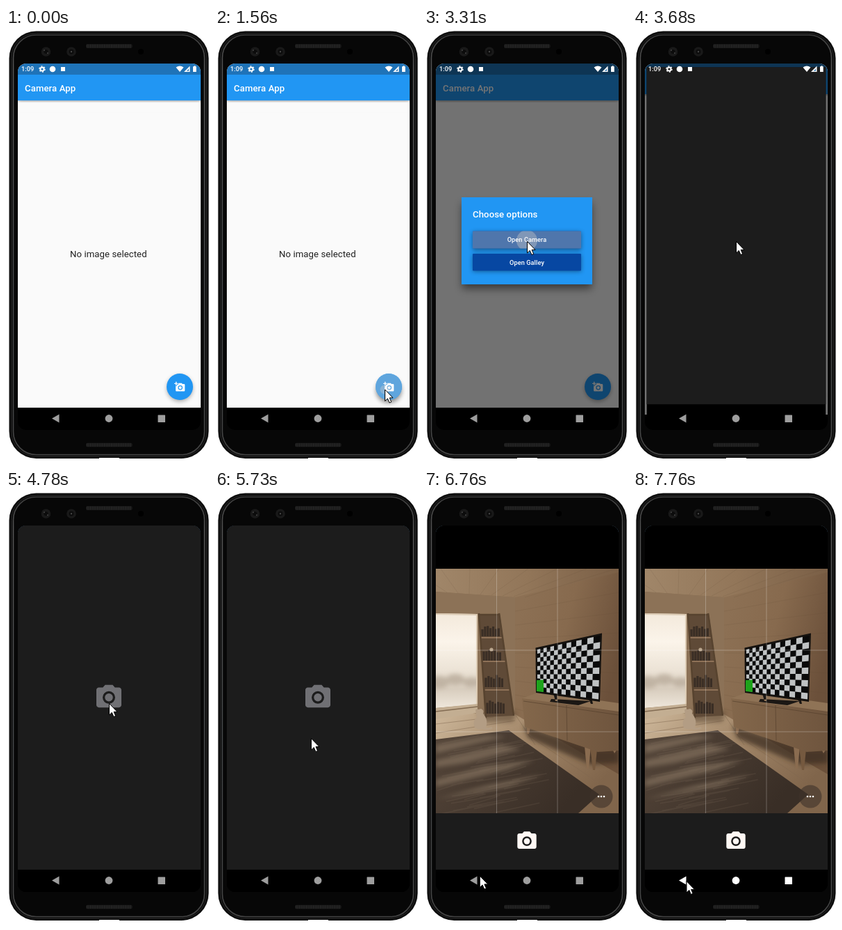
Write an HTML page that moves like this. It is 292 px wide and 623 px high and loops after 8 s.

```html
<!DOCTYPE html>
<html lang="en">
<head>
<meta charset="utf-8">
<title>Camera App</title>
<style>
html, body { margin: 0; width: 100%; height: 100%; overflow: hidden; background: #fff; }
svg { display: block; width: 100vw; height: 100vh; }
text { font-family: Roboto, sans-serif; letter-spacing: .07px; fill: #fff; }
.t { font-size: 13.2px; font-weight: 500; }
.b { font-size: 9.2px; font-weight: 500; text-anchor: middle; }
</style>
</head>
<body>
<svg viewBox="0 0 292 623" xmlns="http://www.w3.org/2000/svg">
<defs>
  <clipPath id="screen"><rect x="17" y="51" width="263" height="526" rx="12"/></clipPath>
  <clipPath id="fabClip"><circle cx="250" cy="515" r="19"/></clipPath>
  <clipPath id="btnClip"><rect x="70" y="291.5" width="156" height="25" rx="1.3"/></clipPath>
  <clipPath id="view"><rect x="17" y="113" width="263" height="351"/></clipPath>
  <clipPath id="pane"><path d="M17 177 76 178V308L17 313z"/></clipPath>
  <clipPath id="rugClip"><path d="M17 358 122 345 252 437 222 464H17z"/></clipPath>
  <filter id="soft" x="-40%" y="-40%" width="180%" height="180%"><feGaussianBlur stdDeviation="3"/></filter>
  <filter id="wide" x="-20%" y="-30%" width="140%" height="160%"><feGaussianBlur stdDeviation="6"/></filter>
  <linearGradient id="rim" x2="0" y2="1">
    <stop offset="0" stop-color="#3c3c3c"/><stop offset=".08" stop-color="#555"/>
    <stop offset=".6" stop-color="#45484a"/><stop offset="1" stop-color="#444"/>
  </linearGradient>
  <linearGradient id="wall" gradientUnits="userSpaceOnUse" x1="131" y1="200" x2="280" y2="240">
    <stop offset="0" stop-color="#8c7054"/><stop offset=".45" stop-color="#876a4e"/><stop offset="1" stop-color="#6b503a"/>
  </linearGradient>
  <linearGradient id="ceil" x2="1"><stop offset="0" stop-color="#a08669"/><stop offset=".5" stop-color="#927659"/><stop offset="1" stop-color="#7a5f46"/></linearGradient>
  <linearGradient id="glass" x2="0" y2="1">
    <stop offset="0" stop-color="#f3e9db"/><stop offset=".3" stop-color="#fbf4ea"/>
    <stop offset=".6" stop-color="#ece3d6"/><stop offset=".8" stop-color="#d8cdbe"/><stop offset="1" stop-color="#efe7db"/>
  </linearGradient>
  <linearGradient id="floor" x2="1" y2=".5"><stop offset="0" stop-color="#cdb79a"/><stop offset=".45" stop-color="#a58a6c"/><stop offset="1" stop-color="#80654b"/></linearGradient>
  <linearGradient id="rug" x2="1" y2=".4"><stop offset="0" stop-color="#55463a"/><stop offset="1" stop-color="#392e26"/></linearGradient>
  <linearGradient id="front" x2="1"><stop offset="0" stop-color="#83674b"/><stop offset="1" stop-color="#6f553e"/></linearGradient>
  <g id="camera">
    <path fill-rule="evenodd" d="M9 2 7.17 4H4c-1.1 0-2 .9-2 2v12c0 1.1.9 2 2 2h16c1.1 0 2-.9 2-2V6c0-1.1-.9-2-2-2h-3.17L15 2zM12 17a5 5 0 1 1 0-10 5 5 0 0 1 0 10z"/>
    <circle cx="12" cy="12" r="3.2"/>
  </g>
</defs>

<g id="phone">
  <rect x="4.5" y="4.5" width="287" height="613.5" rx="39" fill="#0c0c0c"/>
  <rect x="7.5" y="7.5" width="281" height="607.5" rx="36" fill="#0a0a0a" stroke="#262626"/>
  <rect x="10.5" y="10" width="275" height="602.5" rx="33" fill="#070707" stroke="url(#rim)" stroke-width="1.6"/>
  <rect x="134" y="617" width="29" height="1.2" fill="#fff"/>
  <g fill="none" stroke-linecap="round" stroke="#151515" stroke-width="6">
    <path d="M118 26H179M118 598.5H179"/>
    <path d="M116 26H181M116 598.5H181" stroke="#2a2a2a" stroke-width="5" stroke-linecap="butt" stroke-dasharray="1.3 1.2"/>
  </g>
  <g fill="#191919"><circle cx="57.5" cy="34" r="6.8"/><circle cx="94" cy="34" r="6.8"/></g>
  <g fill="#0c0c0c"><circle cx="57.5" cy="34" r="3"/><circle cx="94" cy="34" r="3.4"/></g>
  <g fill="#444"><circle cx="55" cy="32" r="1"/><circle cx="60" cy="36" r="1"/><circle cx="94" cy="34" r="1.2"/></g>
  <circle cx="194" cy="34" r="4" fill="#000"/>
</g>

<g clip-path="url(#screen)">
  <rect x="17" y="51" width="263" height="526"/>
  <g id="app">
    <rect x="17" y="51" width="263" height="494" fill="#fafafa"/>
    <rect x="17" y="66" width="263" height="39" fill="#000" opacity=".4" filter="url(#soft)"/>
    <rect x="17" y="106.5" width="263" height="15" fill="#fafafa"/>
    <rect x="17" y="67" width="263" height="37" fill="#2196f3"/>
    <rect x="17" y="51" width="263" height="16" fill="#1f73b8"/>
    <text class="t" x="27" y="90.7">Camera App</text>
    <text x="92" y="329" font-size="13.2" style="fill:#212121">No image selected</text>
    <circle id="fabShade" cx="250" cy="518" r="18.5" filter="url(#soft)"/>
    <circle cx="250" cy="515" r="19" fill="#2196f3"/>
    <g clip-path="url(#fabClip)">
      <circle id="fabLight" cx="250" cy="515" r="19" fill="#bcbcbc"/>
      <circle id="fabSplash" cx="244" cy="519" fill="#c8c8c8"/>
    </g>
    <path fill="#fff" fill-rule="evenodd" transform="translate(242.1 507.1) scale(.66)" d="M3 4V1h2v3h3v2H5v3H3V6H0V4zM6 10V7h3V4h7l1.83 2H21c1.1 0 2 .9 2 2v12c0 1.1-.9 2-2 2H5c-1.1 0-2-.9-2-2V10zM13 19a5 5 0 1 0 0-10 5 5 0 0 0 0 10zM9.8 14a3.2 3.2 0 1 0 6.4 0 3.2 3.2 0 0 0-6.4 0z"/>
    <g id="dialog">
      <rect x="17" y="51" width="263" height="494" opacity=".54"/>
      <rect x="55" y="252" width="186" height="122" opacity=".5" filter="url(#wide)"/>
      <rect x="54" y="243" width="188" height="125" fill="#2196f3"/>
      <text class="t" x="70" y="271.7">Choose options</text>
      <g opacity=".4"><rect x="70" y="293" width="156" height="26" filter="url(#soft)"/><rect x="70" y="325.5" width="156" height="24" filter="url(#soft)"/></g>
      <rect x="70" y="291.5" width="156" height="25" rx="1.3" fill="#0747a2"/>
      <rect x="70" y="324" width="156" height="24.5" rx="1.3" fill="#0747a2"/>
      <g clip-path="url(#btnClip)">
        <rect id="btnLight" x="70" y="291" width="156" height="26" fill="#bcbcbc"/>
        <circle id="btnSplash" cx="148" cy="305" fill="#c8c8c8"/>
      </g>
      <text class="b" x="148" y="307.2">Open Camera</text>
      <text class="b" x="148" y="339.5">Open Galley</text>
    </g>
  </g>

  <g id="window">
    <rect x="17" y="51" width="263" height="526"/>
    <rect x="17" y="51" width="263" height="494" fill="#1c1c1c"/>
    <g id="viewer">
      <rect x="17" y="51" width="263" height="62"/>
      <g id="room" clip-path="url(#view)">
        <rect x="17" y="113" width="263" height="351" fill="url(#wall)"/>
        <path d="M17 113H280V118L131 154 17 146z" fill="url(#ceil)"/>
        <path d="M17 146 131 154V326H17z" fill="#8c7257"/>
        <path id="planks" fill="none" stroke="#5d4631" stroke-opacity=".14"/>
        <path d="M130 156V324" stroke="#4f3b2a" stroke-width="5" opacity=".4" filter="url(#soft)"/>

        <path d="M17 320 131 322 280 408V464H17z" fill="url(#floor)"/>
        <path d="M17 336 100 326M17 349 131 331M150 352 280 440M131 322 160 366" stroke="#806850" stroke-opacity=".5"/>
        <path d="M76 318 134 318 128 333 86 334z" fill="#594531" opacity=".55" filter="url(#soft)"/>

        <g clip-path="url(#pane)">
          <path d="M17 177H76V313H17z" fill="url(#glass)"/>
          <g fill="#b9ac9b" opacity=".8" filter="url(#soft)">
            <ellipse cx="22" cy="276" rx="14" ry="9"/><ellipse cx="45" cy="272" rx="13" ry="8"/><ellipse cx="68" cy="276" rx="12" ry="7"/>
          </g>
        </g>
        <path d="M17 178 76 179V322" fill="none" stroke="#dccbb4" stroke-width="2"/>
        <path d="M17 313 77 307V320L17 329z" fill="#c3ae92"/>
        <path d="M17 318 77 311" stroke="#826b52" stroke-width="1.5"/>

        <path d="M79 178H109L129 324 88 326z" fill="#5f4a37"/>
        <path id="books" fill="none" stroke="#3a2e25" stroke-width="3.2"/>
        <path d="M80 212H113M82 246H118M84 287H123" stroke="#8e7157" stroke-width="2"/>
        <path d="M79 177 89 327M108 177 129 324M79 179H109" fill="none" stroke="#57432f" stroke-width="2.6"/>
        <circle cx="97" cy="229" r="2.6" fill="#b9a48b"/>

        <g clip-path="url(#rugClip)">
          <path d="M17 345H252V464H17z" fill="url(#rug)"/>
          <path d="M17 366 90 352 118 354 17 378zM17 388 110 366 140 372 60 392 17 398zM17 416 90 396 160 388 120 402 17 426zM17 444 90 424 172 408 120 426z" fill="#9a866f" opacity=".5" filter="url(#soft)"/>
          <path id="weave" fill="none" stroke="#8c7862" stroke-width="1.5" stroke-opacity=".16"/>
        </g>
        <path d="M73 341q-4-9 3-15l-2-10q2-3 4-1l4-1q5 2 3 7 8 9 4 20-8 5-16 0z" fill="#b39d84"/>
        <path d="M85 342q8 2 13-1" fill="none" stroke="#b39d84" stroke-width="3"/>

        <path d="M143 338 250 372 280 372V392L240 394 150 356z" fill="#3d2d20" opacity=".75" filter="url(#soft)"/>
        <path d="M148 336H154L151 350H148zM231 368H240L237 400H234zM270 370H279L274 378z" fill="#8a6c50"/>
        <path d="M239 370 243 402H246L249 372z" fill="#75593f"/>
        <path d="M141 299 166 290 280 306V318z" fill="#8f7356"/>
        <path d="M141 299 280 319V374L250 376 145 340z" fill="url(#front)"/>
        <path d="M143 303 280 323M205 309 206 360" fill="none" stroke="#513d2b" stroke-opacity=".6"/>
        <path d="M183 300 240 303 222 309 181 304zM186 292 189 303H192L191 292zM236 298 240 307H243L241 298z" fill="#1b1714"/>
        <path d="M160.5 226.500 256 205.500 253 304 161 291z" fill="#15120f"/>
        <path d="M163 229 253.500 209 251 300.500 163 288.500z" fill="#0a0a0a"/>
        <path id="checks" fill="#bfc2c3"/>
        <path d="M162 273 172 272.500V290L162 289z" fill="#1ea31b"/>
        <path d="M104.500 113V464M192 113V464M17 230H280M17 347H280" stroke="#fff" stroke-opacity=".26"/>
        <circle cx="255" cy="440" r="16.500" fill="#3f332a" opacity=".6"/>
        <g fill="#fff"><circle cx="251" cy="440" r="1.300"/><circle cx="255" cy="440" r="1.300"/><circle cx="259" cy="440" r="1.300"/></g>
      </g>
      <use href="#camera" fill="#fff8f4" transform="translate(148 502.700) scale(1.370) translate(-12 -11)"/>
    </g>
    <g id="cover">
      <rect x="17" y="51" width="263" height="494" fill="#1c1c1c"/>
      <use id="wait" href="#camera" fill="#707074" transform="translate(148 296) scale(1.8) translate(-12 -11)"/>
    </g>
  </g>

  <rect id="navGlow" fill="#fff"/>
  <g id="nav">
    <path d="M66 560.500 76.500 554.500V566.500z"/><circle cx="148" cy="560.500" r="5.400"/><rect x="218.500" y="555.500" width="10.500" height="10.500" rx=".5"/>
  </g>
  <g id="status" fill="#fff">
    <text x="22" y="62.300" font-size="9.200" font-weight="500" style="letter-spacing:0">1:09</text>
    <circle cx="52" cy="59" r="2.600" fill="none" stroke="#fff" stroke-width="2"/>
    <circle cx="52" cy="59" r="4.100" fill="none" stroke="#fff" stroke-width="1.300" stroke-dasharray="2.100 2.193"/>
    <circle cx="67" cy="59" r="4.300"/>
    <rect x="79" y="56" width="6" height="6"/>
    <path d="M244.500 56.500q5.500-3.800 11 0L250 63zM264.500 54.500V63H256z"/>
    <path d="M263 58.500V61.700H259.800z" fill="#3a7fb8"/>
    <path d="M269.500 55.300h1v-1h2v1h1.200V63h-4.700v-7.700z"/>
  </g>
</g>
<path id="cursor" d="M.5.5V17L4.300 13.400 6.900 19.500 9.700 18.300 7.100 12.400H12z" fill="#fff" stroke="#000" stroke-linejoin="round"/>
</svg>

<script>
const LOOP = 8000;
const el = {};
document.querySelectorAll('[id]').forEach(n => el[n.id] = n);
const set = (name, attrs) => { for (const k in attrs) el[name].setAttribute(k, attrs[k]); };
const mix = (a, b, p) => a + (b - a) * p;
const ramp = (t, a, b) => Math.min(1, Math.max(0, (t - a) / (b - a)));
const smooth = p => p * p * (3 - 2 * p);
const easeOut = p => 1 - (1 - p) ** 2;
const linear = p => p;

// Static room details
function buildRoom() {
  let seed = 5;
  const rnd = () => (seed = seed * 16807 % 2147483647) / 2147483647;
  let d = '';
  for (let i = 1; i < 9; i++) {
    d += `M131 ${154 + i * 20}L280 ${118 + i * 29}`;
    d += `M${17 + i * 16} ${146 + i}L${i * 42 - 60} 113`;
  }
  set('planks', { d });

  d = '';
  [[84, 194], [86, 229], [89, 267], [91, 305]].forEach(([x, y], row) => {
    for (let i = 0; i < 7; i++) d += `M${x + i * 3.9} ${y + 16}v${-10 - rnd() * 6 - row}`;
  });
  set('books', { d });

  d = '';
  for (let i = 0; i < 40; i++) {
    const y = 364 + i * 2.6, x = 17 + rnd() * 110;
    d += `M${x} ${y}l${30 + rnd() * 45} ${-8 - rnd() * 6}`;
  }
  set('weave', { d });

  // Squares on a screen seen at an angle: its near edge is taller by `near`
  const cols = 14, rows = 10, near = 91.5 / 59.5;
  const pt = (c, r) => {
    const p = c / cols, v = r / rows;
    const u = p / (p + (1 - p) * near);
    return `${mix(163, mix(253.5, 251, v), u).toFixed(1)} ${mix(mix(229, 209, u), mix(288.5, 300.5, u), v).toFixed(1)}`;
  };
  d = '';
  for (let c = 0; c < cols; c++)
    for (let r = 0; r < rows; r++)
      if ((c + r) % 2 === 0) d += `M${pt(c, r)}L${pt(c + 1, r)} ${pt(c + 1, r + 1)} ${pt(c, r + 1)}z`;
  set('checks', { d });
}

// Fast start with a very long slow end, made of two cubic pieces
function openEase(x) {
  if (x <= 0 || x >= 1) return x <= 0 ? 0 : 1;
  const [px, py] = x < 1 / 6
    ? [[0, .05, .1333, 1 / 6], [0, 0, .06, .4]]
    : [[1 / 6, .2083, .25, 1], [.4, .82, 1, 1]];
  const at = (p, s) => { const q = 1 - s; return q * q * q * p[0] + 3 * q * q * s * p[1] + 3 * q * s * s * p[2] + s * s * s * p[3]; };
  let lo = 0, hi = 1;
  for (let i = 0; i < 24; i++) {
    const m = (lo + hi) / 2;
    if (at(px, m) < x) lo = m; else hi = m;
  }
  return at(py, lo);
}

// Cursor stops: time, x, y, easing towards the stop
const stops = [
  [110, 290, 589], [340, 262, 569, linear], [640, 231.5, 541, easeOut], [910, 244, 522, smooth],
  [1090, 244, 518.5, linear], [2200, 244, 518.5, linear], [2810, 148, 306, smooth],
  [5280, 148, 306, linear], [5730, 138, 356, linear], [5970, 123, 386.5, linear],
  [6080, 116, 399, linear], [6880, 79, 557, easeOut], [6990, 76.5, 561, linear]
];
function cursorAt(t) {
  for (let i = 1; i < stops.length; i++) {
    const a = stops[i - 1], b = stops[i];
    if (t < b[0]) {
      const p = b[3](ramp(t, a[0], b[0]));
      return [mix(a[1], b[1], p), mix(a[2], b[2], p)];
    }
  }
  return stops[stops.length - 1].slice(1, 3);
}

const zoom = s => `translate(148.5 314) scale(${s}) translate(-148.5 -314)`;

function draw(t) {
  const [x, y] = cursorAt(t);
  set('cursor', { transform: `translate(${x} ${y})`, opacity: t < 110 ? 0 : 1 });

  // Floating button press
  const press = t < 1810 ? ramp(t, 1320, 1500) : 0;
  set('fabLight', { opacity: .4 * press });
  set('fabSplash', { r: 7 * ramp(t, 1320, 1580), opacity: .4 * press });
  set('fabShade', { cy: mix(517.5, 520, press), opacity: mix(.34, .42, press) });

  // Dialog and its first button
  set('dialog', { opacity: t < 1760 ? 0 : t < 1810 ? .6 : 1 });
  const hold = ramp(t, 3060, 3250), release = ramp(t, 3490, 3690);
  set('btnLight', { opacity: .4 * hold * (1 - release) });
  set('btnSplash', { r: mix(15 * ramp(t, 3060, 3310), 79, release), opacity: .4 * ramp(t, 3060, 3135) * (1 - release) });

  // The camera window zooms in over the app
  const open = openEase(ramp(t, 3553, 3953));
  set('app', { transform: zoom(1 + .05 * open) });
  set('window', { transform: zoom(.85 + .15 * open), opacity: ramp(t, 3565, 3640) });
  set('status', { opacity: 1 - ramp(t, 3760, 3880) });
  set('wait', { opacity: t < 4780 ? 0 : 1 });
  set('cover', { opacity: 1 - ramp(t, 5760, 5940) });
  set('viewer', { opacity: t < 5745 ? 0 : 1 });

  // Back key
  const grow = easeOut(ramp(t, 7390, 7540));
  const w = mix(12, 33.5, grow), h = mix(12, 16, grow);
  set('navGlow', {
    x: mix(76, 71.5, grow) - w, y: mix(562, 561, grow) - h, width: 2 * w, height: 2 * h, rx: h,
    opacity: t < 7190 ? 0 : .2 * (1 - ramp(t, 7480, 7750))
  });
  const tone = Math.round(mix(158, 255, ramp(t, 7390, 7640)));
  set('nav', { fill: `rgb(${tone},${tone},${tone})` });
}

buildRoom();
function tick() {
  draw(performance.now() % LOOP);
  requestAnimationFrame(tick);
}
tick();
</script>
</body>
</html>
```
